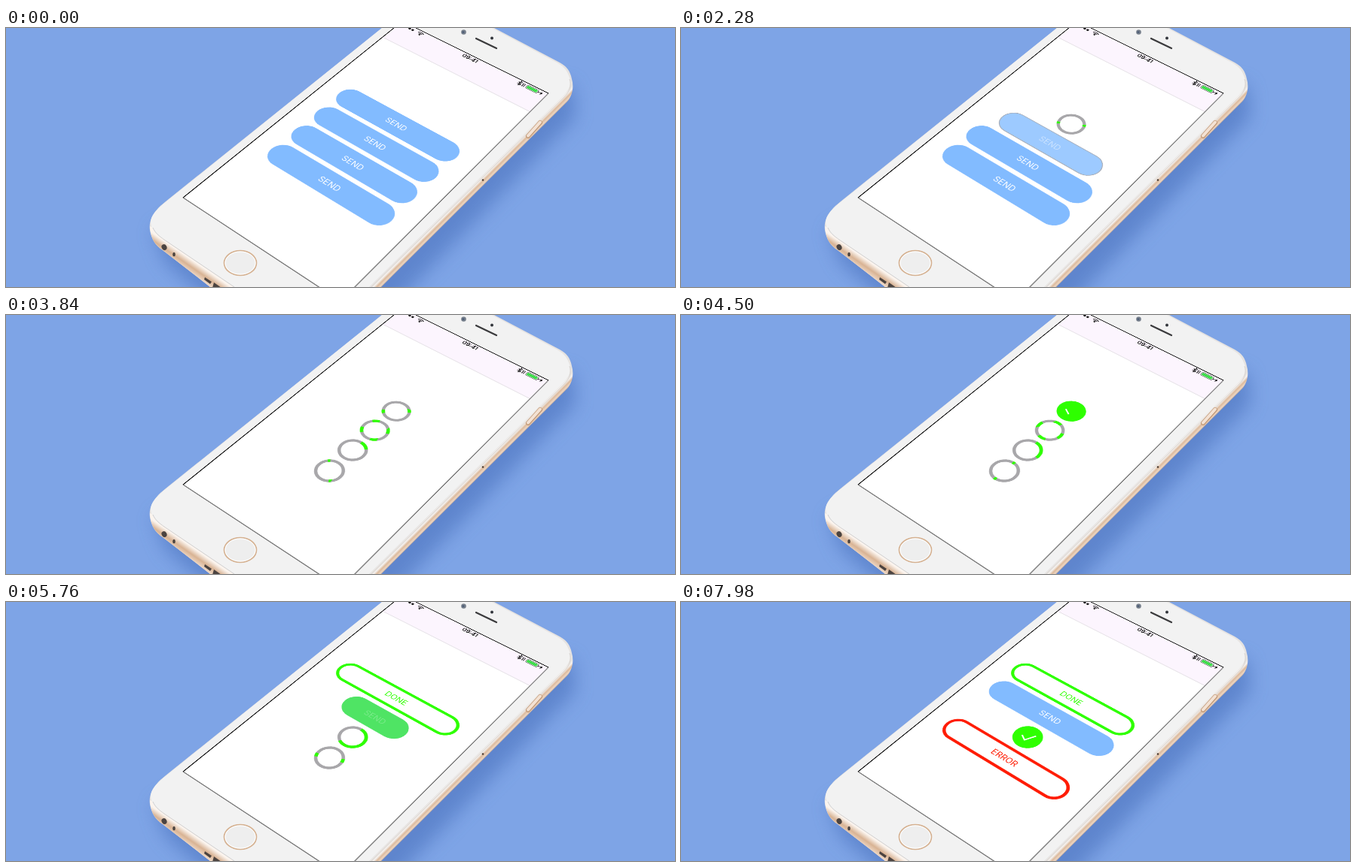
An HTML page for the animation above (8000 ms loop, 888 by 345 pixels).

```html
<!DOCTYPE html>
<html lang="en">
<head>
<meta charset="utf-8">
<title>Send buttons</title>
<style>
  html, body { margin: 0; width: 100%; height: 100%; overflow: hidden; background: #7ea4e6; }
  #stage { position: relative; width: 888px; height: 345px; overflow: hidden; }
  svg { position: absolute; left: 0; top: 0; display: block; }
  /* Projects the flat 375 x 667 screen onto the tilted phone */
  #screen {
    overflow: visible;
    transform-origin: 0 0;
    transform: matrix3d(.3832, .23973, 0, -.0001864, -.494, .2967, 0, -.00024588, 0, 0, 1, 0, 526, -9, 0, 1);
  }
  text { font-family: Inter, Roboto, sans-serif; text-anchor: middle; }
</style>
</head>
<body>
<div id="stage">
  <svg width="888" height="345" viewBox="0 0 888 345">
    <defs>
      <linearGradient id="side" gradientUnits="userSpaceOnUse" x1="620" y1="208" x2="628" y2="216">
        <stop offset="0" stop-color="#e6e3e1"/>
        <stop offset=".3" stop-color="#f4f0ed"/>
        <stop offset=".55" stop-color="#dcba9c"/>
        <stop offset=".8" stop-color="#ecd5c2"/>
        <stop offset="1" stop-color="#c3a48d"/>
      </linearGradient>
      <linearGradient id="rim" gradientUnits="userSpaceOnUse" x1="245" y1="308" x2="236" y2="321">
        <stop offset="0" stop-color="#fbf4ee"/>
        <stop offset=".5" stop-color="#d8b394"/>
        <stop offset="1" stop-color="#f1dccb"/>
      </linearGradient>
      <filter id="blur" x="-20%" y="-20%" width="140%" height="140%"><feGaussianBlur stdDeviation="12"/></filter>
    </defs>

    <path d="M196 270L212 312L290 380H505L756 118L752 76L600 60Z" fill="#4d75c0" opacity=".65" filter="url(#blur)"/>

    <path d="M499 0L212 231C198 242 189 254 191 269C193 282 199 290 208 296L271 345H498L745 98C752 90 754 78 751 68C749 57 744 51 735 46L648 0Z" fill="url(#side)"/>
    <path d="M191 264C192 282 199 290 208 296L271 345H308L210 272Z" fill="url(#rim)"/>
    <path d="M499 0L213 231C198 243 189 253 193 264C196 272 203 277 211 282L303 345H482L738 92C748 82 751 74 748 66C745 57 741 52 733 47L645 0Z" fill="#f2f2f2"/>
    <path d="M195 266C198 273 203 277 210 282L303 345" fill="none" stroke="#cfcfd0"/>
    <path d="M485 345L741 92C748 85 751 77 748 68" fill="none" stroke="#d9d4d0"/>

    <path d="M693 144L709 126" stroke="#c39a78" stroke-width="6" stroke-linecap="round"/>
    <path d="M693 143.500L709 125.500" stroke="#f3e2d4" stroke-width="4" stroke-linecap="round"/>
    <circle cx="633" cy="202.500" r="1.300" fill="#4a3b32"/>
    <g fill="#4b4340">
      <ellipse cx="210" cy="292" rx="3.300" ry="4" transform="rotate(-30 210 292)"/>
      <ellipse cx="223" cy="301.500" rx="1.800" ry="2.800"/>
      <path d="M264 332L273 338L271 341L263 335ZM276 339L286 346H274Z"/>
    </g>

    <circle cx="607.500" cy="5.500" r="3.300" fill="#77808c"/>
    <circle cx="607" cy="5.500" r="1.500" fill="#4f5f78"/>
    <circle cx="645" cy="13.500" r="2" fill="#33363c"/>
    <path d="M624 14L651 27" stroke="#3a3a3c" stroke-width="2.200" stroke-linecap="round"/>

    <ellipse cx="311" cy="313" rx="21.500" ry="16.500" fill="#eeeeee" stroke="#d5b08f" stroke-width="1.600"/>
    <ellipse cx="311" cy="313" rx="20" ry="15" fill="none" stroke="#fff"/>
  </svg>

  <svg id="screen" width="375" height="667" viewBox="0 0 375 667">
    <rect width="375" height="667" fill="#fff"/>
    <rect width="375" height="70" fill="#fcf5fe"/>
    <path d="M0 70.500H375" stroke="#e6e2e7" stroke-width="2"/>
    <path d="M0 667H375V0" fill="none" stroke="#555" stroke-width="1.500"/>
    <path d="M0 667V0H375" fill="none" stroke="#151515" stroke-width="2"/>
    <g fill="#111">
      <circle cx="12" cy="10" r="3"/><circle cx="20" cy="10" r="3"/>
      <circle cx="28" cy="10" r="3"/><circle cx="36" cy="10" r="3"/>
      <circle cx="57" cy="14" r="2"/>
      <path d="M50 8.500Q57 2 64 8.500M53 11.500Q57 7.500 61 11.500" fill="none" stroke="#111" stroke-width="2"/>
      <text x="187.500" y="15.500" font-size="14" font-weight="600">09:41</text>
      <path d="M308 6.500L316 13.500L312 17V3L316 6.500L308 13.500M320 5V16M323.500 5V16" fill="none" stroke="#111" stroke-width="1.600"/>
      <rect x="328.500" y="4.500" width="27" height="11" rx="2" fill="#fff" stroke="#333"/>
      <rect x="330" y="6" width="24" height="8" rx="1" fill="#3fdc4c"/>
      <rect x="356.500" y="8" width="2" height="4"/>
      <path d="M365 4L360 11H363L362 16L367 9H364Z"/>
    </g>
  </svg>
</div>

<script>
const LOOP = 8000, HEIGHT = 58, REACH = 117, STROKE = 6.4;
const BLUE = [130, 187, 255], WHITE = [255, 255, 255], GREY = [168, 167, 170];
const GREEN = [46, 255, 0], RED = [255, 28, 4];
const CHECK = 'M-12 2L0 9.5L11 -12', CROSS = 'M-15 -15L15 15M15 -15L-15 15';

// spin: degrees per second; angle: heading of the first arc at the time `at`
const buttons = [
  { press: 1700, done: 4130, color: GREEN, label: 'DONE', arcs: 2, spin: 339, angle: 285, at: 2940, size: 13 },
  { press: 2200, done: 4850, color: GREEN, label: 'SEND', arcs: 4, spin: 322, angle: 37, at: 2940, size: 27, reset: true },
  { press: 2770, done: 7350, color: GREEN, label: 'DONE', arcs: 1 },
  { press: 3400, done: 6020, color: RED, label: 'ERROR', arcs: 2, spin: 339, angle: 318, at: 3840, size: 11, failed: true }
];

const ramp = (t, start, length) => Math.min(1, Math.max(0, (t - start) / length));
const lerp = (a, b, p) => a + (b - a) * p;
const rgb = color => `rgb(${color})`;
const mix = (a, b, p) => rgb(a.map((v, i) => Math.round(lerp(v, b[i], p))));

function add(parent, name, attrs = {}) {
  const node = document.createElementNS('http://www.w3.org/2000/svg', name);
  set(node, attrs);
  return parent.appendChild(node);
}

function set(node, attrs) {
  for (const key in attrs) node.setAttribute(key, attrs[key]);
}

function setPill(node, width, height, attrs) {
  set(node, { x: -width / 2, y: -height / 2, width, height, rx: height / 2, ...attrs });
}

const phoneScreen = document.getElementById('screen');
buttons.forEach((b, i) => {
  b.y = 267 + 68.4 * i;
  b.group = add(phoneScreen, 'g');
  b.fill = add(b.group, 'rect');
  b.border = add(b.group, 'rect', { fill: 'none' });
  b.arc = add(b.group, 'circle', {
    r: (HEIGHT - STROKE) / 2, pathLength: 360, fill: 'none',
    stroke: rgb(GREEN), 'stroke-width': STROKE + .4
  });
  b.icon = add(b.group, 'path', {
    d: b.failed ? CROSS : CHECK, pathLength: b.failed ? 200 : 100,
    fill: 'none', stroke: '#fff', 'stroke-width': 3
  });
  b.text = add(b.group, 'text', { y: 6.5, 'font-size': 18 });
});

function drawArcs(b, t, start) {
  const share = 360 / b.arcs;
  let angle = 0, size;
  if (b.arcs === 1) {
    size = 360 * Math.pow(ramp(t, start, b.done - start), 1.12);
  } else {
    size = b.size + 9 * ramp(t, start + 600, 1200);
    angle = b.angle + b.spin * (t - b.at) / 1000 - size / 2;
  }
  set(b.arc, {
    transform: `rotate(${angle - 90})`,
    'stroke-dasharray': `${size} ${share - size}`
  });
}

function drawButton(b, t) {
  const shrink = ramp(t, b.press, 370);
  const filled = ramp(t, b.done, 200);
  const drawn = ramp(t, b.done + 250, 300);
  const expand = ramp(t, b.done + 770, 360);
  const shake = b.failed ? ramp(t, b.done + 1130, 400) : 0;
  const offset = 16 * Math.sin(shake * 6 * Math.PI) * (1 - shake * .6);
  const finished = filled > 0;
  const width = 2 * REACH * Math.max(1 - shrink, expand) + HEIGHT;

  b.group.setAttribute('transform', `translate(${187.5 + offset} ${b.y})`);

  let fill = mix(BLUE, WHITE, shrink), opacity = 1;
  let line = mix(GREY, b.color, filled), stroke = STROKE * shrink;
  if (finished) {
    fill = mix(b.color, BLUE, b.reset ? expand : 0);
    opacity = b.reset ? filled : filled * (1 - Math.pow(expand, 1.4));
    if (b.reset) line = mix(b.color, BLUE, expand);
  }
  const inset = finished && !b.reset ? 26 * Math.min(1, expand * 3) : 0;
  setPill(b.fill, width - inset, HEIGHT - inset / 4, { fill, opacity });
  setPill(b.border, width - stroke, HEIGHT - stroke, {
    stroke: line, 'stroke-width': stroke, opacity: shrink > 0 ? 1 : 0
  });

  const spinning = shrink === 1 && filled < 1;
  b.arc.setAttribute('opacity', spinning ? 1 - filled : 0);
  if (spinning) drawArcs(b, t, b.press + 370);

  set(b.icon, {
    opacity: drawn > 0 ? Math.max(0, 1 - expand * 4) : 0,
    'stroke-dasharray': `${drawn * 100} ${b.failed ? 100 - drawn * 100 : 200}`
  });

  b.text.textContent = finished ? b.label : 'SEND';
  set(b.text, {
    fill: finished && !b.reset ? rgb(b.color) : '#fff',
    opacity: finished ? Math.max(0, (expand - .2) / .8) : Math.max(0, 1 - shrink * 2.5)
  });
}

const begin = performance.now();
function frame() {
  const t = (performance.now() - begin) % LOOP;
  buttons.forEach(b => drawButton(b, t));
  requestAnimationFrame(frame);
}
frame();
</script>
</body>
</html>
```
